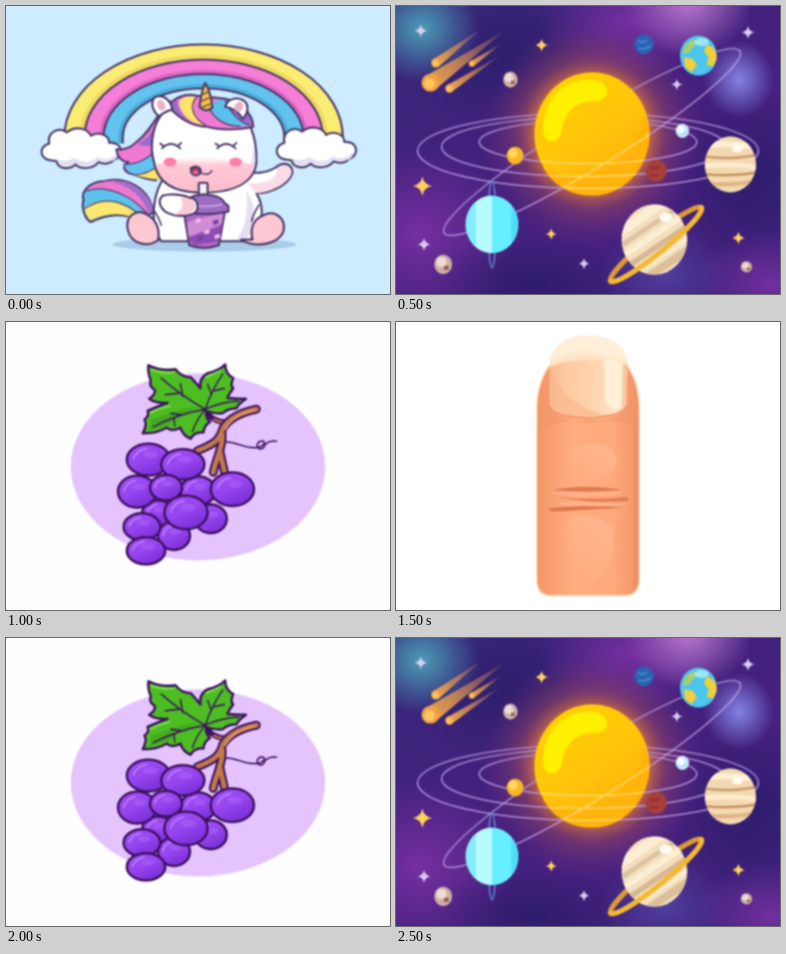
Write an HTML page that moves like this. It is 480 px wide and 360 px high and loops after 3000 ms.

```html
<!DOCTYPE html>
<html lang="en">
<head>
<meta charset="utf-8">
<title>Picture loop</title>
<style>
html, body { margin: 0; width: 100%; height: 100%; overflow: hidden; background: #fff; }
svg { display: block; width: 100vw; height: 100vh; }
.scene { opacity: 0; filter: blur(1.1px); }
</style>
</head>
<body>
<svg id="stage" viewBox="0 0 480 360" preserveAspectRatio="none"></svg>
<script>
const el = (x, y, rx, ry, fill, more = '') =>
  `<ellipse cx="${x}" cy="${y}" rx="${rx}" ry="${ry}" fill="${fill}" ${more}/>`;
const path = (d, fill, more = '') => `<path d="${d}" fill="${fill}" ${more}/>`;
const line = (d, color, w = 2) =>
  path(d, 'none', `stroke="${color}" stroke-width="${w}" stroke-linecap="round" stroke-linejoin="round"`);
const back = fill => `<rect x="-10" y="-10" width="500" height="380" fill="${fill}"/>`;
const clip = (id, shape) => `<clipPath id="${id}">${shape}</clipPath>`;
const clipped = (id, body) => `<g clip-path="url(#${id})">${body}</g>`;
const stops = list => list.map(([o, c, a = 1]) =>
  `<stop offset="${o}" stop-color="${c}" stop-opacity="${a}"/>`).join('');
const linear = (id, list, dir = '') => `<linearGradient id="${id}" ${dir}>${stops(list)}</linearGradient>`;
const radial = (id, list, dir = '') => `<radialGradient id="${id}" ${dir}>${stops(list)}</radialGradient>`;

function unicorn() {
  const ink = '#4a3868';
  const edge = `stroke="${ink}" stroke-width="2.6" stroke-linejoin="round" stroke-linecap="round"`;
  const shape = (d, fill) => path(d, fill, edge);
  const bow = (rx, ry) => `M${247 - rx} 178V164A${rx} ${ry} 0 0 1 ${247 + rx} 164V178`;
  const arch = (rx, ry, fill, shade) =>
    path(bow(rx, ry), fill) + line(bow(rx - 21, ry - 15), shade, 5) + line(bow(rx, ry), ink, 2.6);
  const cloud = shift => `<g transform="translate(${shift})">` +
    shape('M57 193C43 193 39 176 54 172C51 158 66 150 76 158C87 149 102 153 106 162C117 156 129 162 129 171C145 169 149 187 135 192C130 198 121 198 116 195C108 205 92 204 87 198C78 206 65 203 63 194Z', '#fff') +
    path('M59 190C70 195 79 194 85 190C95 197 107 196 115 189C124 193 133 191 139 184C142 193 129 197 116 193C108 202 93 202 87 196C78 203 67 201 64 193Z', '#dfe0f4') + '</g>';
  const eye = x => line(`M${x - 11} 178Q${x} 167 ${x + 12} 178M${x - 9} 175L${x - 13} 172M${x + 9} 175L${x + 13} 171`, ink, 2.2);
  return '<defs>' + linear('muzzle', [[0, '#ffc9d5', 0], [.25, '#ffc9d5'], [1, '#fdbccb']], 'x2="0" y2="1"') + '</defs>' +
    back('#cdecff') +
    arch(174, 116, '#fbec74', '#efd95f') + arch(149, 97, '#f57fd6', '#dd66c4') +
    arch(125, 79, '#62c3ee', '#4dabda') + path(bow(101, 61), '#cdecff', edge) +
    `<rect x="60" y="172" width="380" height="10" fill="#cdecff"/>` +
    cloud('0 0') + cloud('294 -1') +
    el(248, 298, 115, 9, '#a9cde9') +
    // tail
    shape('M184 258C180 228 150 212 123 219C104 219 93 233 97 242C94 251 98 266 106 270C129 259 150 259 164 268Z', '#5cc2ec') +
    path('M184 256C178 228 149 213 122 220C110 222 104 226 100 231C124 223 152 233 176 261Z', '#ef79d0') +
    path('M184 254C178 230 153 217 128 219C152 223 170 236 178 259Z', '#a070cc') +
    path('M98 253C116 238 145 239 167 262L162 267C145 257 126 259 106 268C101 264 99 258 98 253Z', '#fbe870') +
    line('M101 231C124 223 157 236 176 259M99 253C123 237 148 243 169 263', ink, 1.5) +
    // body and raised arm
    shape('M200 211C184 231 178 270 194 294H304C322 278 324 252 313 234C332 234 353 223 358 209C358 195 345 195 337 202C325 209 309 211 296 205Z', '#fff') +
    path('M313 234C332 233 353 222 357 209C357 198 346 197 338 203C341 216 325 223 302 222Z', '#fbdce6') +
    path('M300 232C312 246 316 274 300 292H288C300 278 303 255 300 232Z', '#e6def2') +
    shape('M190 293C176 302 156 298 152 279C149 261 164 254 175 260C188 266 193 280 190 293Z', '#fdc8d2') +
    shape('M294 292C309 303 341 299 347 281C350 264 335 255 323 261C309 266 305 278 308 292Z', '#fdc8d2') +
    line('M184 254C188 260 192 266 194 274M316 249C313 254 309 260 307 269', ink) +
    // side mane and head
    shape('M205 119C190 132 181 157 164 169C155 179 144 180 138 179C139 190 146 195 153 195C145 200 147 206 154 209C165 211 169 216 187 218L208 190Z', '#f07ad2') +
    path('M147 198C164 198 176 192 187 180L194 209C177 216 162 212 153 207Z', '#62c3ee') +
    path('M158 211C173 210 184 205 192 197L196 217C182 217 173 214 158 211Z', '#fbe56a') +
    path('M201 124C188 142 184 164 164 172C177 178 187 175 194 163Z', '#9a6ccc') +
    line('M147 198C165 198 178 190 186 181M159 211C175 211 184 205 191 199', ink, 1.5) +
    shape('M192 139C182 155 180 178 185 195C190 224 215 234 248 233C288 233 311 219 313 195C314 165 304 136 283 124C252 109 211 111 192 139Z', '#fff') +
    path('M304 160C312 185 309 208 290 222C300 218 312 205 312 190Z', '#e6def2') +
    path('M187 199C206 186 284 185 311 200C304 224 282 231 248 231C216 232 195 223 187 199Z', 'url(#muzzle)') +
    el(205, 195, 8, 5.5, '#ff7fa8') + el(287, 195, 8, 5.5, '#ff7fa8') +
    eye(206) + eye(275) +
    // forelock
    shape('M238 112C222 108 206 117 204 127C217 140 232 151 252 151C274 157 299 153 309 151C309 134 290 116 266 115Z', '#f07ad2') +
    path('M215 118C209 120 206 124 206 127C212 133 221 140 230 144C219 136 214 127 215 118Z', '#9a6ccc') +
    path('M238 114C226 111 217 116 216 121C219 136 231 147 249 149C235 139 230 125 238 114Z', '#fbe56a') +
    path('M255 127C262 146 283 151 304 150C301 132 283 116 263 117Z', '#5cc0ec') +
    path('M274 117C291 119 307 137 307 149C293 146 283 136 274 117Z', '#9a6ccc') +
    line('M238 114C228 125 234 140 249 149M254 127C260 142 276 151 292 150M274 118C282 137 294 145 304 149', ink, 1.5) +
    // ears and horn
    shape('M191 138C180 128 181 115 189 113C198 111 206 119 208 129Q197 133 191 138Z', '#fff') +
    el(194, 124, 5, 7, '#e9b3c6', 'transform="rotate(-20 194 124)"') +
    shape('M274 126C277 116 288 113 297 118C305 124 302 135 296 141Q288 128 274 126Z', '#fff') +
    el(291, 126, 5.5, 6.5, '#e9b3c6', 'transform="rotate(25 291 126)"') +
    shape('M242 126C243 114 245 105 249 96C254 105 257 115 258 127C253 132 246 131 242 126Z', '#f2c352') +
    line('M245 111L253 107M244 119L256 114M244 127L257 122', '#80583f', 2) +
    // mouth
    shape('M231 203C234 200 240 200 243 204C245 211 236 214 232 209Z', '#a83a62') +
    el(237, 208, 4, 2.5, '#e8688c') +
    line('M241 207C248 212 255 211 257 206', ink, 2) +
    // drink and near arm
    `<rect x="241" y="221" width="11" height="25" rx="2" fill="#f4f0fa" ${edge}/>` +
    shape('M222 255L229 299Q247 306 266 299L274 255Z', '#b266c6') +
    path('M226 270L272 258L270 272L228 288Z', '#d08cd4') +
    path('M228 290L270 275L266 294L235 299Z', '#8c4bb3') +
    [[236, 267], [258, 269], [247, 281], [239, 289], [260, 287]].map(([x, y], i) =>
      `<rect x="${x}" y="${y}" width="7" height="5" fill="${i % 2 ? '#7442a0' : '#ecb6e4'}" transform="rotate(-20 ${x} ${y})"/>`).join('') +
    shape('M225 246C228 232 267 232 273 246L278 250V257Q248 263 220 257V250Z', '#9a6cc4') +
    line('M229 248Q249 253 270 248', '#cba6e2', 2) +
    shape('M196 237C207 234 222 236 230 240C239 240 242 251 237 258C228 264 210 264 199 257C191 250 190 242 196 237Z', '#fff') +
    path('M218 240C226 238 237 242 237 250C236 260 222 262 210 261C220 256 224 248 218 240Z', '#fdc8d2');
}

function space() {
  const arcs = [[240, 181, 213, 47], [235, 176, 178, 37], [240, 170, 136, 27]];
  const half = ([x, y, rx, ry], sweep, color) =>
    line(`M${x - rx} ${y}A${rx} ${ry} 0 0 ${sweep} ${x + rx} ${y}`, color, 2);
  const orbits = (sweep, color) => `<g opacity=".75">${arcs.map(a => half(a, sweep, color)).join('')}` +
    `<g transform="rotate(-31.6 245 170)">${half([245, 170, 217, 31], sweep, color)}</g></g>`;
  const star = (x, y, r, color) => path(
    `M${x} ${y - r}Q${x + r * .15} ${y - r * .15} ${x + r} ${y}Q${x + r * .15} ${y + r * .15} ${x} ${y + r}` +
    `Q${x - r * .15} ${y + r * .15} ${x - r} ${y}Q${x - r * .15} ${y - r * .15} ${x} ${y - r}Z`, color);
  const comet = (x, y, r, tx, ty) =>
    path(`M${x - r * .65} ${y - r * .7}L${tx} ${ty}L${x + r * .65} ${y + r * .7}Z`, 'url(#tail)') +
    el(x, y, r, r, '#f2a444') + el(x - r * .1, y + r * .1, r * .6, r * .6, '#ffc660');
  const rock = (x, y, rx, ry) => el(x, y, rx, ry, '#cdb0a6') +
    el(x - rx * .2, y - ry * .25, rx * .6, ry * .55, '#ecdccf') + el(x + rx * .35, y + ry * .35, rx * .3, ry * .25, '#94655f');
  const glow = (x, y, rx, ry, id) => el(x, y, rx, ry, `url(#${id})`);
  const aura = (id, color, a) => radial(id, [[0, color, a], [1, color, 0]]);
  const ring = (sweep, color) =>
    `<g transform="rotate(-39 325 298)">${line(`M252 298A73 11 0 0 ${sweep} 398 298`, color, 6.5)}</g>`;
  return '<defs>' +
    linear('night', [[0, '#33297a'], [.35, '#42217c'], [.65, '#46207e'], [1, '#3a2278']], 'x2="1" y2="1"') +
    aura('teal', '#4ea9bc', .9) + aura('violet', '#8a35ae', .7) + aura('pink', '#c27fd6', .95) +
    aura('blue', '#8a8ef0', .9) + aura('haze', '#5a52b4', .6) + aura('dark', '#241c66', .7) +
    radial('heat', [[.5, '#d9763f', .85], [.66, '#a04a60', .5], [1, '#6b2a86', 0]]) +
    linear('sun', [[0, '#ffd400'], [.6, '#ffc30b'], [1, '#ffac0c']], 'x2=".7" y2="1"') +
    linear('tail', [[0, '#f5ae4c'], [.45, '#cf8a52', .85], [1, '#b07468', .25]], 'x1="0" y1="1" x2="1" y2="0"') +
    clip('disc', el(245, 160, 72, 77, '#000')) +
    clip('earth', el(378, 62, 23, 25, '#000')) + clip('banded', el(418, 198, 32, 35, '#000')) +
    clip('ice', el(120, 273, 33, 36, '#000')) + clip('ringed', el(323, 292, 41, 44, '#000')) +
    '</defs>' + back('url(#night)') +
    glow(30, 285, 120, 110, 'violet') + glow(150, 70, 130, 90, 'dark') +
    glow(170, 345, 130, 60, 'dark') + glow(440, 210, 100, 110, 'dark') +
    glow(290, 20, 110, 70, 'violet') + glow(470, 350, 100, 70, 'violet') +
    glow(366, -8, 80, 72, 'pink') + glow(32, 28, 72, 66, 'teal') +
    glow(429, 92, 44, 48, 'blue') + glow(335, 335, 80, 60, 'haze') +
    glow(245, 160, 140, 144, 'heat') + orbits(1, '#b595de') + orbits(0, '#c3a2e6') +
    el(245, 160, 72, 77, 'url(#sun)') +
    path('M184 157C183 113 213 91 244 92C265 94 272 111 253 119C225 117 211 132 207 157C203 174 186 173 184 157Z', '#fff000') +
    path('M311 135C326 185 288 239 244 237C216 237 194 221 184 202C230 230 301 204 311 135Z', '#ffb30c') +
    clipped('disc', orbits(0, '#ffe27c')) +
    comet(50, 71, 6, 106, 29) + comet(95, 72, 4, 132, 47) + comet(67, 103, 5.5, 130, 62) + comet(43, 96, 11, 134, 32) +
    // small planets
    el(310, 48, 12, 12.5, '#2a62b0') + line('M303 44Q308 47 313 43M304 53Q310 55 318 50', '#4687cc', 2.5) +
    el(149, 187, 10.5, 11, '#f6b62a') + el(146, 184, 6, 6, '#ffd75b') +
    el(358, 156, 8.5, 9, '#bfe4f8') + el(356, 154, 5, 5, '#f3fbff') +
    el(325, 206, 13, 13.5, '#a83f38') + line('M318 202Q323 205 329 200M319 212H327', '#8b2f35', 2.5) +
    // green and blue planet
    el(378, 62, 23, 25, '#4cc6ec') + clipped('earth',
      path('M361 50L370 42L377 44L371 52L366 58L358 60Z', '#a8cf6a') +
      path('M388 48L397 52L402 64L396 76L388 73L391 64L385 57Z', '#f0cf3c') +
      path('M360 64L371 66L376 74L369 83L361 76Z', '#f0cf3c') +
      el(382, 45, 9, 5, '#c4f2fb', 'opacity=".7"')) +
    // banded planet
    el(418, 198, 32, 35, '#f3d9b0') + clipped('banded',
      line('M384 175Q413 170 451 176', '#fff0d6', 7) + line('M384 188Q417 193 452 186', '#c99a6c', 3) +
      line('M384 200Q421 196 452 202', '#fdebcf', 6) + line('M384 210Q419 214 452 208', '#c69164', 3) +
      line('M390 222Q418 225 448 219', '#e0b585', 5) + el(427, 178, 7, 5, '#fffaf0')) +
    // icy planet with its upright ring
    el(120, 273, 5, 54, 'none', 'stroke="#6482d0" stroke-width="2"') +
    el(120, 273, 33, 36, '#66f0ff') + clipped('ice',
      `<rect x="86" y="232" width="14" height="82" fill="#86ecff"/><rect x="100" y="232" width="20" height="82" fill="#b6fbff"/>` +
      `<rect x="144" y="232" width="12" height="82" fill="#50dcf8"/>`) +
    // ringed planet
    ring(1, '#dc9a34') + el(323, 292, 41, 44, '#f3dfbd') + clipped('ringed',
      `<g transform="rotate(-34 323 292)">` +
      [[260, '#fbeed4', 12], [275, '#dcc3a2', 6], [287, '#fbeed2', 8], [301, '#d6b896', 7], [314, '#fbebcd', 6], [326, '#dcc09a', 10]]
        .map(([y, c, w]) => line(`M270 ${y}H376`, c, w)).join('') + '</g>' +
      el(337, 264, 8, 6, '#fffaf0')) + ring(0, '#f5b833') +
    rock(143, 92, 9, 10) + rock(59, 323, 11, 12) + rock(438, 326, 7, 7) +
    [[33, 225, 12], [182, 49, 8], [194, 285, 7], [428, 290, 8]].map(s => star(...s, '#ffd15b')).join('') +
    [[31, 31, 8], [440, 33, 8], [351, 98, 7], [35, 298, 8], [235, 322, 7]].map(s => star(...s, '#d9cdf2')).join('');
}

function grapes() {
  const ink = '#3d1160';
  const edge = `stroke="${ink}" stroke-width="3" stroke-linejoin="round"`;
  const grape = ([x, y, rx, ry]) => el(x, y, rx, ry, 'url(#grape)', edge) +
    line(`M${x - rx * .7} ${y - ry * .05}Q${x - rx * .55} ${y - ry * .6} ${x - rx * .1} ${y - ry * .68}`, '#b57afa', 2.5) +
    el(x + rx * .1, y - ry * .3, rx * .35, ry * .22, '#b16efa', 'opacity=".4"');
  const bunch = [[178, 172, 27, 20], [240, 211, 22, 18], [190, 240, 20, 17], [164, 212, 24, 20], [256, 246, 20, 18],
    [210, 267, 20, 18], [221, 178, 27, 19], [200, 207, 20, 16], [283, 209, 27, 21], [225, 238, 27, 21],
    [170, 256, 23, 17], [175, 286, 24, 17]];
  const stem = 'M313 109C293 113 279 120 271 133C267 147 262 152 239 161M270 139C272 155 262 172 259 188M267 160Q270 174 273 187';
  return '<defs>' + linear('grape', [[0, '#a34ff8'], [.55, '#9645ef'], [1, '#7a30d6']], 'x2=".6" y2="1"') + '</defs>' +
    back('#fefefe') + el(240, 181, 159, 117, '#e5c4fd') +
    line('M274 150C288 149 296 158 311 157C323 157 327 147 318 149C310 152 315 163 322 157C324 151 330 148 338 149', ink, 2) +
    line('M252 115Q262 126 277 125', ink, 7) + line('M260 122Q268 126 277 125', '#b97245', 3) +
    `<g stroke-linecap="butt">${line(stem, ink, 11)}${line(stem, '#c17a4b', 6)}</g>` +
    line('M310 110C291 115 281 122 274 134', '#e1a06e', 2) +
    bunch.map(grape).join('') +
    path('M178 54Q194 62 212 59Q219 69 231 69Q239 78 243 83Q241 70 252 64Q266 61 274 53Q274 65 284 70Q280 80 284 83Q278 91 277 95Q287 96 300 96Q291 102 288 108Q277 108 271 114Q259 115 250 111Q249 120 255 125Q247 130 247 138Q235 137 231 146Q221 142 218 132Q207 138 201 132Q187 140 171 139Q177 128 173 122Q180 117 177 111Q191 105 202 101Q187 102 179 96Q187 91 186 85Q178 80 181 73Q177 64 178 54Z', '#4cbe21', edge) +
    path('M249 107C232 106 219 116 204 128Q193 132 178 136Q183 127 180 122C202 117 225 103 249 107Z', '#43aa20') +
    line('M182 60Q197 65 210 63M268 61Q257 66 250 69M180 114Q193 107 205 105', '#87e44e', 2) +
    line('M249 109Q220 93 194 70M249 109Q258 83 271 65M249 109Q272 99 291 99M249 109Q215 115 184 131M249 109Q238 122 233 137M221 93L218 77M216 89L199 91M257 91L252 78M260 86L273 83M219 116L206 114M210 120L211 130', ink, 1.8);
}

function finger() {
  const body = 'M194 52C183 64 176 86 176 110V324Q177 342 195 342H286Q303 341 304 324V110C304 86 298 66 287 52Z';
  const nail = 'M192 52C195 30 213 17 241 17C269 17 287 30 290 52L288 105Q286 112 273 115Q240 124 207 116Q193 113 192 103Z';
  return '<defs>' +
    linear('skin', [[0, '#f29468'], [.1, '#f89d70'], [.35, '#ffac80'], [.75, '#ffa97c'], [.92, '#f69a6d'], [1, '#ee8b60']]) +
    linear('plate', [[0, '#f8b88c'], [.18, '#ffc89e'], [.6, '#ffd6b1'], [.85, '#ffe4c8'], [1, '#f7bb91']]) +
    linear('soft', [[0, '#ffc09a', .7], [1, '#ffb187', .15]], 'x1="1" y1="0" x2="0" y2="1"') +
    clip('nail', path(nail, '#000')) + '</defs>' +
    back('#fff') + path(body, 'url(#skin)', 'stroke="#ffd6ac" stroke-width="1.5"') +
    path('M178 112C178 88 185 70 192 60V108Q198 122 241 126Q283 122 290 106V60C297 76 302 91 302 112V134C283 119 201 118 178 136Z', '#f39568', 'opacity=".55"') +
    path('M216 165C223 150 251 147 267 157C282 169 276 192 257 197C240 205 228 195 234 186C240 176 213 176 216 165Z', 'url(#soft)') +
    path('M213 249C231 235 263 242 271 261C274 289 263 323 245 326C222 320 210 280 213 249Z', 'url(#soft)') +
    path('M196 210Q238 202 282 210Q240 214 196 210Z', '#df7950') +
    path('M202 219Q246 223 288 219Q294 222 288 224Q244 227 202 219Z', '#e17d54') +
    path('M191 233Q225 228 285 232Q235 235 196 237Q190 236 191 233Z', '#dd774f') +
    line('M196 214Q240 217 282 213M204 227Q246 229 286 228', '#ffbd97', 1.5) +
    path(nail, 'url(#plate)') + clipped('nail',
      path('M188 10H295V58C277 43 206 43 188 60Z', '#ffe8cd') +
      path('M192 52C207 34 245 28 291 54V38L260 10H205Z', '#fff0dc', 'opacity=".75"') +
      path('M192 52C198 83 221 105 263 117L207 121L190 108Z', '#f9b98e', 'opacity=".65"') +
      path('M260 39Q273 43 283 50L282 107Q272 112 262 101Z', '#fff2de', 'opacity=".85"') +
      line('M192 56C212 41 267 40 290 54', '#ffd9b6', 1.5)) +
    line('M192 105Q194 113 207 116Q240 124 273 115Q286 112 288 105', '#e98d60', 1.5);
}

const scenes = [unicorn, space, grapes, finger];
const order = [0, 1, 2, 3, 2, 1];
const hold = 500;

const stage = document.getElementById('stage');
stage.innerHTML = scenes.map(draw => `<g class="scene">${draw()}</g>`).join('');

const start = document.timeline.currentTime || 0;
stage.querySelectorAll('.scene').forEach((scene, id) => {
  const steps = order.map((shown, i) => ({
    opacity: shown === id ? 1 : 0, offset: i / order.length, easing: 'step-end'
  }));
  steps.push({ opacity: steps[0].opacity, offset: 1 });
  const run = scene.animate(steps, { duration: hold * order.length, iterations: Infinity });
  run.startTime = start;
});
</script>
</body>
</html>
```
